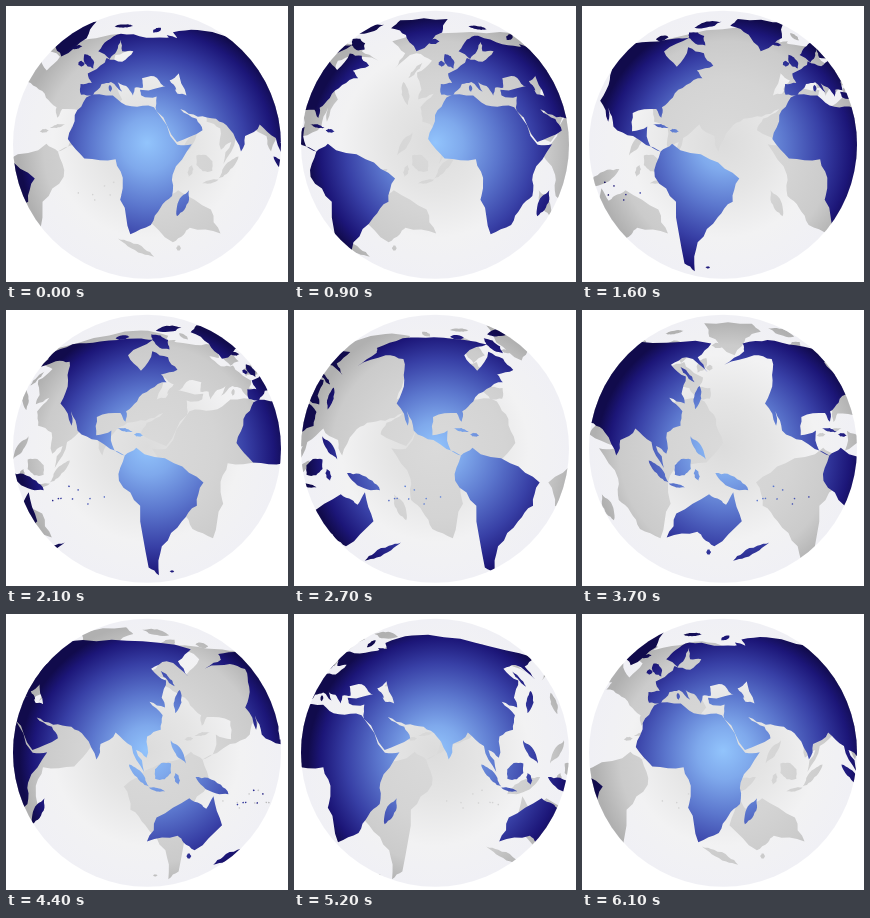
An HTML page with a canvas for the animation above (6.2 s loop, 282x276 px).

```html
<!DOCTYPE html>
<html lang="en">
<head>
<meta charset="utf-8">
<title>Globe</title>
<style>
  html, body { margin: 0; width: 100%; height: 100%; overflow: hidden; background: #fff; }
  canvas { display: block; }
</style>
</head>
<body>
<canvas id="globe" width="282" height="276"></canvas>
<script>
const ctx = document.getElementById('globe').getContext('2d');
const CX = 141, CY = 138.7, R = 134;
const STEP = 100, STEPS = 62;   // ms per step, steps per turn
const TURN = 498;               // map width in px
const MIRROR = 2;               // where the far side is reflected
const LENS = 110;               // radius where the northern rim starts to bend

// Key points of the coasts, "lon lat" pairs
const continents = {
  africa: '-6 36 10 37 20 31.5 33 31 43 11.5 51 11.8 40 -4 40.5 -15 35 -21 31 -30 20 -34.8 12 -17 13 -9 9 4 -8 4.4 -17 14.5 -13 27',
  europe: '66 68 44 67 26 71 13 66 5 60 12 56 18 60 24 66 22 60 30 60 20 54.5 10 56.5 8 54 -4 48.5 -2 43.5 -9 43 -9 37.5 -2 37 4 43 10 44 16 39 13 45 19 42 22 37 24 41 29 41 30 46 38 47 42 42 49 40 47 45 52 47 66 55',
  asia: '62 69 55 50 54 37 49 38 48 43 27 40 27 37 36 36.5 34 29 43 13 58 19 56 25 48 30 57 26 67 25 73 20 77.5 8 81 16 91 22 98 15 103 1.5 100 13 105 9 108 20 117 23.5 122 31 119 38 126 35 128 40 140 49 138 55 155 59 157 51 163 59 188 66 150 71.5 104 77 72 72.5 68 67',
  northAmerica: '-168 66 -156 71 -128 70 -95 69 -82 68 -94 60 -80 52 -78 62 -65 59 -56 52.5 -66 50 -61 46 -70 42.5 -76 36 -81 31 -80 25.5 -84 30 -97 28 -95 18.5 -87 21 -84 11 -78 8 -94 16 -106 21 -113 31 -110 23.5 -121 35 -124 47 -135 58 -150 60 -164 55 -160 62',
  southAmerica: '-78 8 -72 12 -51 4 -35 -6 -39 -18 -48 -26 -62 -39 -69 -54 -74 -50 -70.5 -18 -81 -5',
  australia: '114 -22 129 -12 136 -15 140 -17.5 142 -11 153 -26 147 -39 137 -35 131 -31.5 115 -34.5',
  greenland: '-54 78 -35 70 -25 60 -5 71 6 85 -50 85'
};

// Islands run from one end to the other: lon lat lon lat width
const islands = {
  madagascar: '49.5 -12 45 -25.5 4', sumatra: '95 5.5 106 -6 3', java: '106 -6.5 115 -8.5 1.5',
  borneo: '109 -2 118 6 7', sulawesi: '120 1 122 -5 2.5', newGuinea: '131 -1 150 -10 5',
  philippines: '120.5 18 126 6 3', japan: '130 32 143 44 3', sakhalin: '142 46 143 54 2',
  newZealand: '167 -46.5 178 -37 2.5', tasmania: '145 -42 148 -42 2.5',
  britain: '0 51 -5 58.5 4', ireland: '-8 52 -7.5 55 3', iceland: '-17 65 -8 65 2.5',
  svalbard: '24 79 42 78 3', novayaZemlya: '53 71 66 76 3', sardinia: '9 39 9 42.5 1.5',
  cuba: '-84 22 -75 20.5 1.3', hispaniola: '-74 19 -69 18.5 1.8', falklands: '-61 -52 -58 -52 1',
  baffin: '-66 63 -88 73 6', victoria: '-116 71 -104 71 4', ellesmere: '-88 77 -66 82 5'
};

let seed = 7;
function random() {
  seed = seed * 16807 % 2147483647;
  return seed / 2147483647;
}

function project(lon, lat) {
  const squeeze = 1 - 6.6e-5 * lat * lat;
  return [60 + 1.84 * squeeze * (lon + 18), 161 - 1.93 * lat];
}

// Split every edge, pushing its middle sideways a little
function roughen(ring) {
  return ring.flatMap(([x, y], i) => {
    const [nx, ny] = ring[(i + 1) % ring.length];
    const dx = nx - x, dy = ny - y;
    const push = (random() - 0.5) * 0.22 * Math.min(1, 22 / Math.hypot(dx, dy));
    return [[x, y], [(x + nx) / 2 - dy * push, (y + ny) / 2 + dx * push]];
  });
}

function coast(text) {
  const n = text.split(' ').map(Number), ring = [];
  for (let i = 0; i < n.length; i += 2) ring.push(project(n[i], n[i + 1]));
  return roughen(roughen(ring));
}

function island(text) {
  const [lon1, lat1, lon2, lat2, width] = text.split(' ').map(Number);
  const a = project(lon1, lat1), b = project(lon2, lat2);
  const dx = b[0] - a[0], dy = b[1] - a[1], k = width / Math.hypot(dx, dy);
  const side = (along, s) => [a[0] + dx * along - dy * k * s, a[1] + dy * along + dx * k * s];
  return roughen(roughen([a, side(0.3, 1), side(0.7, 1), b, side(0.7, -1), side(0.3, -1)]));
}

const lands = [...Object.values(continents).map(coast), ...Object.values(islands).map(island)];
for (let i = 0; i < 9; i++) {
  const lon = 155 + 33 * random(), lat = -7 - 14 * random();
  lands.push(island(`${lon} ${lat} ${lon + 1} ${lat - 0.5} 0.8`));
}

function bend(x, y) {
  const dx = x - CX, dy = y - CY, r = Math.hypot(dx, dy);
  if (r <= LENS || dy >= 0) return [x, y];
  const keep = 1 + 0.5 * dy / r;
  const scale = (LENS + (r - LENS) * keep) / r;
  return [CX + dx * scale, CY + dy * scale];
}

// The dark rim is heavier toward the upper left
function shade(lean, ...stops) {
  const g = ctx.createRadialGradient(CX, CY - 2, 0, CX + lean, CY + lean, R);
  stops.forEach(([at, color]) => g.addColorStop(at, color));
  return g;
}

const sea = shade(0, [0, '#dcdcdc'], [0.35, '#e5e5e5'], [0.7, '#f2f2f3'], [1, '#f0f0f5']);
const far = shade(5, [0, '#dadada'], [0.5, '#d4d4d4'], [0.8, '#cbcbcb'], [1, '#b0b0b0']);
const near = shade(7, [0, '#92c4fc'], [0.2, '#7fa9ec'], [0.45, '#5b76cd'], [0.7, '#3840a6'], [0.9, '#1c1678'], [1, '#110b4c']);

function drawLands(fill, flip, shift) {
  ctx.fillStyle = fill;
  for (const ring of lands) {
    ctx.beginPath();
    for (const [x, y] of ring) ctx.lineTo(...bend(flip * x + shift, y));
    ctx.fill();
  }
}

function draw(ms) {
  const shift = Math.floor(ms / STEP) % STEPS / STEPS * TURN;
  ctx.clearRect(0, 0, 282, 276);
  ctx.save();
  ctx.beginPath();
  ctx.arc(CX, CY, R, 0, 2 * Math.PI);
  ctx.clip();
  ctx.fillStyle = sea;
  ctx.fillRect(0, 0, 282, 276);
  for (const k of [0, 1, 2]) drawLands(far, -1, MIRROR - shift + k * TURN);
  for (const k of [0, 1]) drawLands(near, 1, shift - k * TURN);
  ctx.restore();
}

const start = performance.now();
function tick() {
  draw(performance.now() - start);
  requestAnimationFrame(tick);
}
tick();
</script>
</body>
</html>
```
